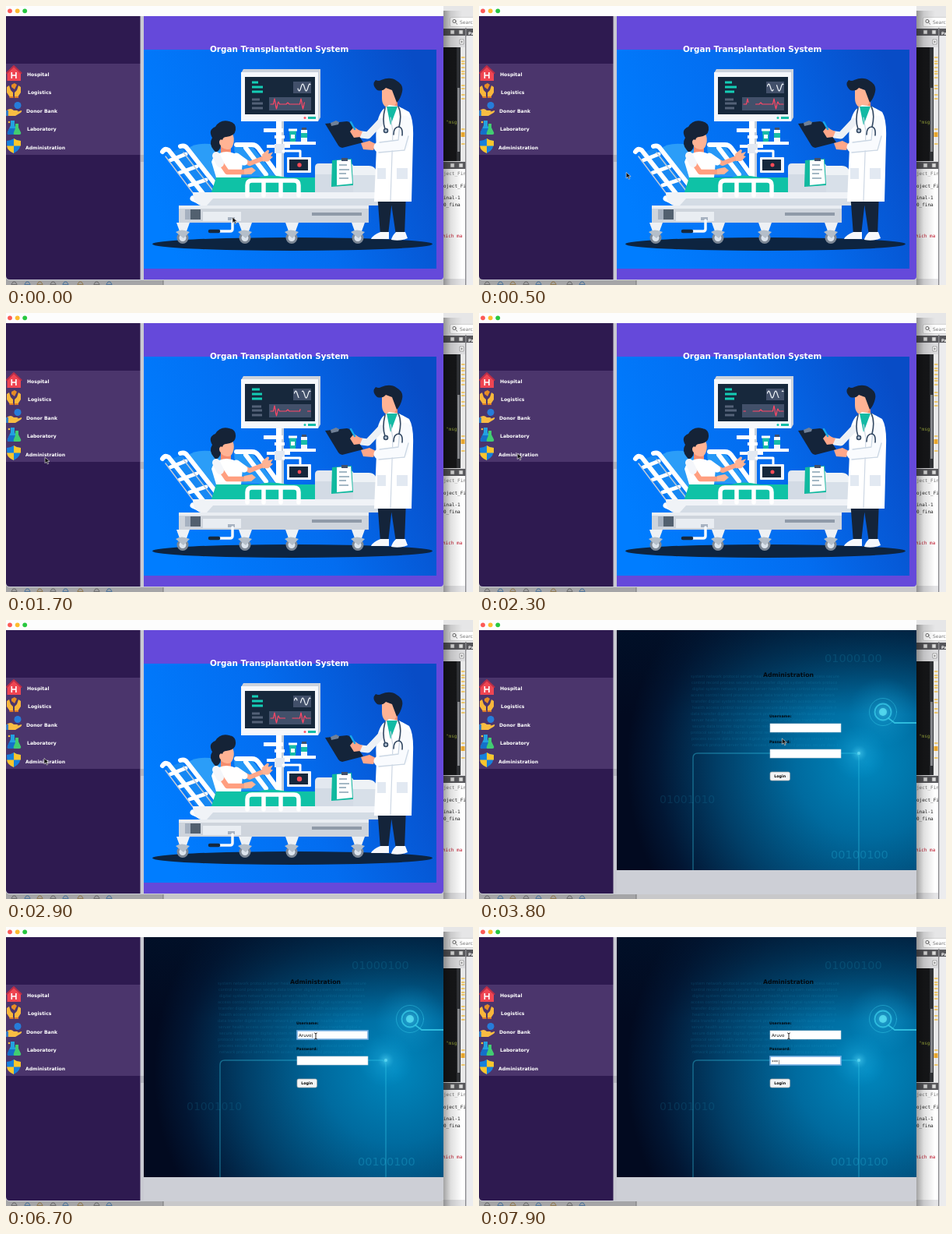
An HTML page that plays this animation: 600 px wide and 358 px high, repeating every 8000 ms.

```html
<!DOCTYPE html>
<html lang="en">
<head>
<meta charset="utf-8">
<title>Organ Transplantation System</title>
<style>
html,body{margin:0;width:100%;height:100%;overflow:hidden;background:#ddd}
svg{display:block;width:100vw;height:100vh}
text{font-family:"DejaVu Sans",sans-serif;white-space:pre}
.b{font-weight:700}
.mono{font-family:"DejaVu Sans Mono",monospace;font-size:6px}
.line{fill:none;stroke-linecap:round;stroke-linejoin:round}
</style>
</head>
<body>
<svg viewBox="0 0 600 358" preserveAspectRatio="none">
<defs>
  <linearGradient id="sky" x1="0" y1=".6" x2="1" y2=".3"><stop stop-color="#007dff"/><stop offset=".5" stop-color="#036df0"/><stop offset="1" stop-color="#084cc6"/></linearGradient>
  <radialGradient id="deep" gradientUnits="userSpaceOnUse" cx="500" cy="185" r="310"><stop stop-color="#0087bd"/><stop offset=".3" stop-color="#006b9f"/><stop offset=".62" stop-color="#013f68"/><stop offset=".88" stop-color="#021633"/><stop offset="1" stop-color="#020a20"/></radialGradient>
  <linearGradient id="dim" x1="0" y1="0" x2="0" y2="1"><stop stop-color="#01132c" stop-opacity=".65"/><stop offset=".35" stop-color="#01132c" stop-opacity="0"/></linearGradient>
  <radialGradient id="glow"><stop stop-color="#5fe0ff" stop-opacity=".75"/><stop offset=".3" stop-color="#25b4e6" stop-opacity=".35"/><stop offset="1" stop-color="#0aa0dc" stop-opacity="0"/></radialGradient>
  <linearGradient id="shade"><stop stop-opacity=".36"/><stop offset=".4" stop-opacity=".12"/><stop offset="1" stop-opacity="0"/></linearGradient>
  <clipPath id="mainClip"><rect x="177" y="13" width="385" height="308"/></clipPath>
  <clipPath id="codeClip"><path d="M562 0h28v358h-28z"/></clipPath>
</defs>

<!-- editor behind the window -->
<rect width="600" height="358" fill="#dedee0"/>
<path d="M562 0h38v29h-38z" fill="#e6e6e7"/>
<rect x="570.5" y="14.500" width="40" height="12" rx="2" fill="#fff" stroke="#c4c4c4" stroke-width=".7"/>
<g class="line" stroke="#666" stroke-width=".9"><circle cx="576" cy="19.500" r="2.100"/><path d="M577.600 21.200l2 2"/></g>
<text x="583" y="23" font-size="6" fill="#777">Search</text>
<path d="M562 29h38v9h-38zM562 200h28v9h-28z" fill="#57575b"/>
<path d="M590 28h1.500v330h-1.500z" fill="#86868a"/>
<path d="M591.500 39h9v319h-9z" fill="#ececee"/>
<text class="b" x="594" y="36.500" font-size="5" fill="#fff">Pa</text>
<g fill="#ddd" stroke="#777" stroke-width=".6"><path d="M571 31h5v5h-5zM582 31h5v5h-5zM571 202h5v5h-5zM582 202h5v5h-5z"/></g>
<path d="M562 38h28v15h-28z" fill="#dcdcde"/>
<path d="M583 43h5v6h-5z" fill="#fff" stroke="#777" stroke-width=".6"/><path d="M584 46h3M585.500 44.500v3" stroke="#555" stroke-width=".6"/>
<path d="M562 53h17v146h-17z" fill="#161719"/>
<path d="M579 53h5v146h-5z" fill="#303236"/><path d="M580 105h3v82h-3z" fill="#8a8c90"/>
<path d="M584 53h6v146h-6z" fill="#e9e9e9"/>
<g id="ticks" stroke="#f1b62c" stroke-width="1.300"></g>
<path d="M584.500 162h5v6h-5z" fill="#e9a72e"/>
<g clip-path="url(#codeClip)">
  <text class="mono" x="565" y="151" fill="#9aa83c">"msg</text>
  <path d="M562 209h28v149h-28z" fill="#fff"/>
  <text class="mono" x="562" y="217" fill="#777">ject_Fin</text>
  <text class="mono" x="562" y="233" fill="#222">oject_Fi</text>
  <text class="mono" x="562" y="248" fill="#222">inal-1</text>
  <text class="mono" x="562" y="257" fill="#222">0_fina</text>
  <text class="mono" x="561" y="297" fill="#c21328">hich ma</text>
</g>
<path d="M0 350h202v8H0z" fill="#bcbcbe"/><path d="M202 350h388v8H202z" fill="#e4e4e6"/><path d="M202 350v8" stroke="#888"/>
<g id="tools" class="line" stroke-width="1"></g>
<path d="M562 6h24v352h-24z" fill="url(#shade)"/>
<path d="M0 350h562v8H0z" opacity=".12"/>

<!-- window -->
<path d="M0 0H562V347q0 5-5 5H5q-5 0-5-5z" fill="#cdcfd6"/>
<path d="M0 0h562v13H0z" fill="#fdfdfd"/>
<circle cx="5" cy="6.300" r="2.900" fill="#fc5b57"/><circle cx="14.700" cy="6.300" r="2.900" fill="#fdbc2e"/><circle cx="24.200" cy="6.300" r="2.900" fill="#28c840"/>
<path d="M0 13h173v338H5q-5 0-5-5z" fill="#2e1a50"/>
<path d="M0 74h173v117H0z" fill="#4b356c"/>
<path d="M172.500 13h4.500v338h-4.500z" fill="#c9cad2"/><path d="M174 191v9M176 191v9" stroke="#888b96" stroke-width=".7"/>
<g id="menu" class="b" font-size="6.100" fill="#fff"></g>

<!-- menu icons -->
<path d="M1.500 86L10 77l9 9v10H1.500z" fill="#ef4552"/><path d="M1 86l9-9 9.500 9" class="line" stroke="#b92e48" stroke-width="2"/>
<path d="M7.300 85v8M12.900 85v8M7.300 89h5.600" stroke="#fff" stroke-width="1.600"/>
<path d="M1 104l3-2 2 6 3 3v6H5l-4-6zM19 104l-3-2-2 6-3 3v6h4l4-6z" fill="#f8b73b"/><path d="M7 101l4-2 3 2-3 6-4-3z" fill="#e68b25"/><path d="M4.500 116h5v2h-5zM11 116h5v2h-5z" fill="#dc7928"/>
<circle cx="15" cy="127.500" r="4.500" fill="#267cda"/>
<path d="M1 134q5-4 9 0h4q3 1 0 2l6-2q1 2-3 4l-5 3H1z" fill="#f9bd43"/><path d="M0 134h3v7H0z" fill="#367cc5"/>
<path d="M6 147h5v6l4 9q1 3-2 3H4q-3 0-2-3l4-9z" fill="#23a1e0"/><path d="M4 157h9l2 5q1 3-2 3H4q-3 0-2-3z" fill="#1470ca"/>
<path d="M12 151h4v5l3 6q1 3-2 3h-6q-2 0-1-3l2-5z" fill="#42cc72"/><circle cx="4" cy="149" r="1.300" fill="#f3bf3d"/>
<path d="M10 170q4 3 9 3 1 11-9 16-10-5-9-16 5 0 9-3z" fill="#1681dc"/><path d="M10 170q4 3 9 3v6.500h-9zM1 179.500h9V189Q2 186 1 179.500z" fill="#fac62d"/>

<!-- home page -->
<g id="home">
  <path d="M177 13h385v334q0 4-4 4H177z" fill="#6549da"/>
  <path d="M177 56h376v281H177z" fill="url(#sky)"/>
  <text class="b" x="262" y="59" font-size="10.400" fill="#fff">Organ Transplantation System</text>
  <ellipse cx="368" cy="305.500" rx="180" ry="8.500" fill="#0d2440"/>

  <!-- monitor and stand -->
  <path d="M347 147h10v78h-10z" fill="#fff"/><path d="M354 147h3v78h-3z" fill="#c6d0dc"/>
  <path d="M302 86l3-5h99v62l-3 5h-99z" fill="#cbd2dc"/><path d="M302 85h99v63h-99z" fill="#f6f8fc"/>
  <path d="M307 91h90v48h-90z" fill="#17283c"/><path d="M369 97h23v15h-23zM338 117h54v17h-54z" fill="#42506a"/>
  <g id="bars"></g>
  <path id="wave" class="line" stroke="#f1f6fa" stroke-width="1.200"/><path id="pulse" class="line" stroke="#ff4766" stroke-width="1.200"/>
  <circle id="lamp" cx="384" cy="143.500" r="1.500"/><path d="M388 142h10v3h-10z" fill="#10bda7"/>
  <path d="M331 157h25v5h-25zM356 174h42v4h-42zM345 166h13v4h-13zM335 178h30v4h-30z" fill="#fff"/><path d="M345 177h13v12h-13z" fill="#e2e8f1"/>
  <path class="line" d="M356 186h22v10" stroke="#fff" stroke-width="3"/>
  <path d="M364 160h9l-1 14h-7z" fill="#17bca8"/><path d="M363 157.500h11v3h-11zM366 165h5v5h-5z" fill="#fff"/>
  <path d="M379 159h8v15h-8z" fill="#f2f7fc"/><path d="M379 163h8v6h-8z" fill="#17bca8"/><path d="M380 156h6v3h-6z" fill="#42506a"/>
  <rect x="361" y="194" width="31" height="20" rx="1" fill="#f3f6fb"/><path d="M364 197h24v14h-24z" fill="#17283c"/><circle id="beat" cx="377" cy="204" fill="#ff4b57"/>

  <!-- back of bed -->
  <path d="M206 190l20-8 46 58h-26z" fill="#1688f4"/><path d="M232 184q10-9 30-7l24 12v40h-20z" fill="#2b9df8"/>
  <path d="M293 181h24l30 38h-50z" fill="#2598f7"/>
  <g class="line" stroke="#fff" stroke-width="6">
    <path d="M296 178h20q5 0 8 4l24 33M308 182l26 34"/>
    <path d="M201 187q3-5 8-2l46 58h11M224 180q6-2 9 3l40 51"/>
    <path d="M211 198l20-8M223 214l22-8M236 230l21-7" stroke-width="5"/>
    <path d="M240 247l9 4h24" stroke-width="7"/>
  </g>
  <path class="line" d="M205 193l39 52M228 188l38 49" stroke="#c0cbd9" stroke-width="1.500"/>

  <!-- patient -->
  <path d="M276 178h13v15h-13z" fill="#f58c6e"/>
  <path d="M273 164h18q3 6 1 13-2 8-8 7-9-1-11-10z" fill="#ffb394"/>
  <path d="M267 185q-7-8-2-16-6-10 4-14 6-10 18-7 9 2 8 11-1 8-12 9-4 0-5 4-3-2-4 2 0 4 2 5-1 6-5 8-2 1-4-2z" fill="#152337"/>
  <path d="M274 189q9-4 19 0l11 11-2 20h-32l-6-20q2-8 10-11z" fill="#fff"/>
  <path d="M273 197l11 16 25 0" class="line" stroke="#ff9f80" stroke-width="6.500"/>
  <path d="M306 209l10-2 5 4-6 5h-9z" fill="#ffb394"/>
  <path d="M270 192l5 10" class="line" stroke="#f4f6fa" stroke-width="10"/>
  <g id="arm"><path d="M301 196l12 6 20-8" class="line" stroke="#ffa789" stroke-width="6"/><path d="M329 190l7-6 2 1-1 4 6-2-3 5 3 1-6 6-7 0z" fill="#ffb394"/><path d="M296 193l10 7" class="line" stroke="#fff" stroke-width="9"/></g>

  <!-- bed -->
  <path d="M270 220h54q14-5 37 0h36v25H262z" fill="#0fc2a6"/>
  <path d="M397 207q0-5 5-5h40q4 0 5 5v46h-50z" fill="#e3e8ef"/><path d="M397 216h50v26h-50z" fill="#d3dbe5"/>
  <path d="M446 205h20q10 0 11 12l2 22h-33z" fill="#eef2f6"/><path d="M446 217h31l2 22h-33z" fill="#d8e0e9"/>
  <path d="M240 239h239q2 0 2 4v13H250q-10-3-10-17z" fill="#f0f3f7"/><path d="M266 247h213v9H258z" fill="#d4dce5"/>
  <g class="line" stroke="#fff" stroke-width="5.500"><path d="M310 243v-13q0-6 6-6h54q6 0 6 6v13M331 226v17M353 226v17"/></g>
  <path d="M419 198l25-2 2 34-28 2z" fill="#11b99f"/><path d="M425 198l18-1 2 31-20 2z" fill="#fff"/>
  <path d="M428 204h10M428 210h13M428 215h9M428 221h12" stroke="#87a1b2" stroke-width="1.500"/><path d="M431 195h8v4h-8z" fill="#42506a"/>
  <path d="M222 256h244v22H222z" fill="#ced4dc"/><path d="M222 256h244v4H222zM253 264h49v12h-49z" fill="#e9edf2"/>
  <path d="M230 261h20v13h-20z" fill="#a6b1c0"/><path d="M237 261h13v13h-13z" fill="#52606f"/>
  <path d="M393 267h64" stroke="#8f9aa8" stroke-width="4"/><path d="M285 271h9v4h-9z" fill="#a6b1c0"/>
  <path class="line" d="M291 275v11q0 3-3 3h-13" stroke="#f5f8fc" stroke-width="3.500"/><path class="line" d="M262 289h11" stroke="#17283c" stroke-width="4.500"/>
  <g id="casters"></g>

  <!-- doctor -->
  <path d="M477 240h20l-6 54h-10zM493 240h21l-2 54h-11z" fill="#14243a"/>
  <path d="M481 290h11v9h-23q2-5 12-9zM501 290h12l3 8q-9 4-21 2 1-5 6-10z" fill="#f6f8fb"/>
  <path d="M488 119h15v16h-15z" fill="#f58c6e"/>
  <path d="M483 105q12-4 20 0v14q-2 11-10 12-10-1-10-13z" fill="#ffb394"/>
  <path d="M477 108q-8-7-2-13 4 2 7 0 12-5 20 1 9 5 7 14-2 9-7 14l-3-8-3-8-8-3q-4 5-11 3z" fill="#152337"/>
  <path d="M484 133l8-6 13 2 13 7q6 10 5 34l-2 81h-48l3-70q-3-34 8-48z" fill="#fff"/>
  <path d="M489 129h14l-9 24z" fill="#13baa4"/><path d="M494 143l3 18-3 89" class="line" stroke="#cdd7e4" stroke-width="1.200"/>
  <path d="M502 208h14v14h-14zM477 208h11v14h-11z" fill="#e2e9f2"/>
  <path d="M482 148l-17 18-8-1" class="line" stroke="#edf1f6" stroke-width="9"/>
  <path d="M410 151l28-3q3 0 5 3l16 24-27 7q-3 0-5-3z" fill="#14243a"/><path d="M417 150l7-3 4 2-1 3-9 2z" fill="#718197"/>
  <path d="M442 161l5-6 6 4 5 2-3 7-8 1z" fill="#ffa789"/><path class="line" d="M443 149l5 9" stroke="#18a6e8" stroke-width="2.500"/>
  <path d="M456 176l11-3 8 4-3 8-13-1z" fill="#ffa789"/>
  <path d="M513 147l-2 30-32 4" class="line" stroke="#f9fbfe" stroke-width="13"/><path d="M506 151l-2 21-24 3M479 188l33-3 5-18" class="line" stroke="#cbd7e4" stroke-width="1.300"/>
  <g class="line" stroke="#334862" stroke-width="1.600"><path d="M487 131q-4 16 0 27M504 129q5 10 1 26M505 155q-7 0-7 10M505 155q5 1 4 11"/><circle cx="488" cy="160" r="2.500" fill="#b9c8d9"/></g>
</g>

<!-- login page -->
<g id="login" clip-path="url(#mainClip)">
  <path d="M177 13h385v308H177z" fill="url(#deep)"/><path d="M177 13h385v308H177z" fill="url(#dim)"/>
  <g id="faint" fill="#24a9d4" opacity=".2" font-size="5"></g>
  <g class="mono" fill="#28b8df"><text x="452" y="306" style="font-size:14.500px" opacity=".3">00100100</text><text x="444" y="54" style="font-size:14.500px" opacity=".15">01000100</text><text x="232" y="235" style="font-size:14px" opacity=".13">01001010</text></g>
  <circle cx="519" cy="118" r="45" fill="url(#glow)" opacity=".7"/><circle cx="488" cy="171" r="35" fill="url(#glow)" opacity=".8"/>
  <g class="line" stroke="#39cce9"><path d="M275 321V177q0-6 6-6h201q6 0 6 6v144" stroke-width="1.500" opacity=".38"/><circle cx="519" cy="118" r="17.500" opacity=".45"/><circle cx="519" cy="118" r="10.500" stroke-width="1.800" opacity=".75"/><path d="M526 126l8 6h28" stroke-width="1.800" opacity=".8"/></g>
  <circle cx="519" cy="118" r="5" fill="#5ee5f5" opacity=".75"/><circle cx="488" cy="171" r="2" fill="#6bdef5" opacity=".7"/>
  <g class="b" fill="#020910"><text x="365" y="73" font-size="7.750">Administration</text><text x="373" y="125" font-size="4.700">Username:</text><text x="373" y="158" font-size="4.700">Password:</text></g>
  <rect id="userBox" x="374" y="133" width="91" height="11" fill="#fff"/><rect id="passBox" x="374" y="166" width="91" height="11" fill="#fff"/>
  <g font-size="5.600" fill="#111"><text id="user" x="376" y="140.800"/><text id="pass" x="376" y="174.500"/></g>
  <rect x="374" y="195" width="25.500" height="11" rx="2" fill="#f3f4f5" stroke="#aaa" stroke-width=".7"/><text class="b" x="386.700" y="202.400" font-size="4.800" text-anchor="middle">Login</text>
</g>

<path id="arrow" d="M0 0v7.500l2-1.800 1.300 3 1.400-.6-1.300-2.900H6z" fill="#111" stroke="#eee" stroke-width=".6"/>
<path id="beam" class="line" d="M-1.500-4L0-3l1.500-1M0-3v6M-1.500 4L0 3l1.500 1" stroke="#111" stroke-width=".9"/>
</svg>
<script>
const LOOP = 8000, PAGE_SWITCH = 3200, BEAM_START = 4500;
const USER = "Aruvo", USER_KEYS = [5300, 5600, 5800, 6050, 6300];
const PASS_FOCUS = 6800, PASS_KEYS = [7150, 7450, 7750];
// time, x, y
const mousePath = [[0,291,271],[250,280,262],[850,40,134],[1050,40,133],[1600,50,185],[1900,50,186],[2500,49,178],[3200,49,177],[3700,389,152],[3950,390,152],[4500,398,140],[8000,398,140]];
const $ = id => document.getElementById(id);
const set = (id, attrs) => Object.entries(attrs).forEach(([k, v]) => $(id).setAttribute(k, v));
const show = (id, on) => $(id).style.display = on ? "" : "none";
const lerp = (a, b, k) => a + (b - a) * k;

$("menu").innerHTML = [["Hospital",27],["Logistics",28],["Donor Bank",26],["Laboratory",27],["Administration",25]]
  .map(([label, x], i) => `<text x="${x}" y="${89.5 + i * 23.5}">${label}</text>`).join("");
$("ticks").innerHTML = [66,71,74,79,84,87,92,102,106,114,119,158,177]
  .map(y => `<path d="M585 ${y}h4.500"/>`).join("");
$("tools").innerHTML = [10,27,43,60,76,95,116,132]
  .map((x, i) => `<path d="M${x - 3} 357l2-3h3l2 3z" stroke="${["#777","#4f7fae","#a28654"][i % 3]}"/>`).join("");
$("casters").innerHTML = [227,307,367,452].map(x => `
  <path d="M${x - 8} 278h17l-4 11h-9z" fill="#eef1f5"/>
  <circle cx="${x}" cy="297.500" r="7.500" fill="#7d8896"/><circle cx="${x}" cy="297.500" r="4.500" fill="#dce4ed"/>
  <path d="M${x - 9} 290q7-5 18 0l-8 8z" fill="#b4bec9"/>`).join("");
const words = "system secure access network data control protocol transfer record server digital process health".split(" ");
$("faint").innerHTML = Array.from({length: 12}, (_, row) => {
  const line = Array.from({length: 12}, (_, i) => words[(row * 5 + i * 3) % words.length]).join(" ").slice(0, 74);
  return `<text x="${272 + row % 3}" y="${74 + row * 8}">${line}</text>`;
}).join("");

function mouseAt(t) {
  const i = Math.max(1, mousePath.findIndex(p => p[0] > t));
  const [a, b] = [mousePath[i - 1], mousePath[i]];
  const k = (t - a[0]) / (b[0] - a[0]), ease = k * k * (3 - 2 * k);
  return [lerp(a[1], b[1], ease), lerp(a[2], b[2], ease)];
}

// A scope trace with a blank stretch that sweeps across it.
function trace(from, to, head, gap, yAt) {
  let d = "", pen = false;
  for (let x = from; x <= to; x += .5) {
    const off = Math.abs(x - lerp(from, to, head)) < gap / 2;
    if (!off) d += `${pen ? "L" : "M"}${x} ${yAt(x).toFixed(2)}`;
    pen = !off;
  }
  return d;
}

function heartbeat(x) {
  const p = (x - 340) % 34;
  const peak = (at, width, height) => Math.max(0, 1 - Math.abs(p - at) / width) * height;
  return 126 - peak(5, 1.5, 7) + peak(7.5, 1.5, 6) - peak(10, 1.5, 3) - peak(22, 2, 2);
}

function drawHome(t) {
  const s = t / 1000;
  set("pulse", {d: trace(340, 391, (.95 + s * .52) % 1, 9, heartbeat)});
  set("wave", {d: trace(370.5, 391, (.1 + s * .75) % 1, 4, x => 104.5 - 4.5 * Math.sin((x - 370) * .7))});
  const step = Math.floor(t / 300);
  $("bars").innerHTML = Array.from({length: 6}, (_, i) => {
    const width = [8, 13, 12, 10, 13, 12][i] + (i + step) % 3;
    const y = [98, 104, 110, 120, 125, 131][i];
    return `<path d="M316 ${y}h${width}" stroke="${i < 3 ? "#14cdb5" : "#536177"}" stroke-width="3"/>`;
  }).join("");
  set("lamp", {fill: step % 3 ? "#11c5ad" : "#ff5264"});
  set("beat", {r: 2.7 + .5 * Math.sin(s * 7)});
  set("arm", {transform: `rotate(${.8 * Math.cos(s * 3.2)} 299 196)`});
}

function drawField(name, text, focused) {
  $(name).textContent = text + (focused ? "|" : "");
  set(name + "Box", {stroke: focused ? "#76aee2" : "#c5d1db", "stroke-width": focused ? 1.6 : .6});
}

function draw(t) {
  const home = t < PAGE_SWITCH, beam = t >= BEAM_START;
  const typed = keys => keys.filter(at => at <= t).length;
  show("home", home);
  show("login", !home);
  if (home) drawHome(t);
  drawField("user", USER.slice(0, typed(USER_KEYS)), beam && t < PASS_FOCUS);
  drawField("pass", "*".repeat(typed(PASS_KEYS)), t >= PASS_FOCUS);
  const [x, y] = mouseAt(t);
  show("arrow", !beam);
  show("beam", beam);
  set(beam ? "beam" : "arrow", {transform: `translate(${x} ${y})`});
}

const start = performance.now();
function tick(now) {
  draw(Math.max(0, now - start) % LOOP);
  requestAnimationFrame(tick);
}
draw(0);
requestAnimationFrame(tick);
</script>
</body>
</html>
```
